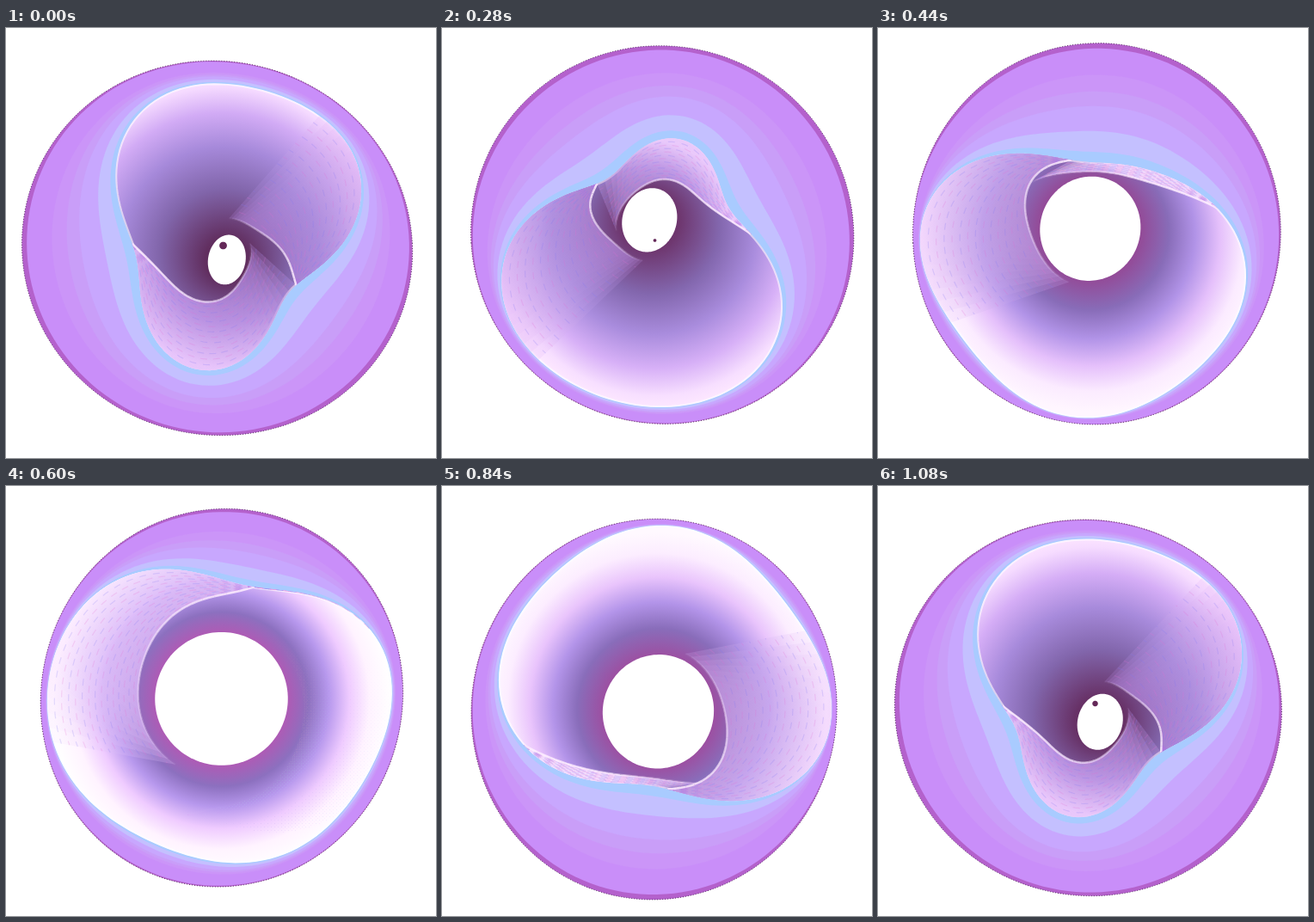
These frames come from a looping animation (500 by 500 pixels, 1120 ms). An HTML page with a canvas:

```html
<!DOCTYPE html>
<html lang="en">
<head>
<meta charset="utf-8">
<title>Twisting ring</title>
<style>
  html, body { margin: 0; width: 100%; height: 100%; overflow: hidden; background: #fff; }
  canvas { display: block; width: 500px; height: 500px; }
</style>
</head>
<body>
<canvas id="stage" width="500" height="500"></canvas>
<script>
const ctx = document.getElementById('stage').getContext('2d');
const LOOP = 1120, STEP = 40, OPEN_AT = 660, SAMPLES = 48;
const { sin, cos, PI } = Math, RAD = PI / 180;

const clamp = (v, lo, hi) => Math.max(lo, Math.min(hi, v));
const mix = (a, b, u) => a + (b - a) * u;
const mixAll = (a, b, u) => a.map((v, i) => mix(v, b[i], u));
const smooth = u => u * u * (3 - 2 * u);
const polar = (r, a) => [r * cos(a), r * sin(a)];
const rgb = hex => [1, 3, 5].map(i => parseInt(hex.slice(i, i + 2), 16));
const blend = (a, b, u) => `rgb(${mixAll(rgb(a), rgb(b), u).map(Math.round)})`;
const sweep = (from, to, at, n = SAMPLES) =>
  Array.from({ length: n + 1 }, (_, i) => at(mix(from, to, i / n) * RAD, i / n));
const loop = at => sweep(0, 360, at, 144);

// Even harmonics follow cosines of the phase and odd ones sines,
// so a negative phase is the same pose turned by 180 degrees.
function shapeAt(p) {
  const c = cos(p), c2 = cos(2 * p), s = sin(p), s2 = sin(2 * p);
  const outer = a => 219 - 4 * c
    + (1.7 * s2 - 5.7 * s) * cos(a) + 11.3 * s * sin(a)
    + (1.8 * c2 - 5.5 * c - .8) * cos(2 * a) - 2.8 * c * sin(2 * a);
  const lip = a => 160 + 21 * c + 4.5 * c2
    + (15 * s - 1.5 * s2) * cos(a) + (4 * s2 - 54 * s) * sin(a)
    + (3 + 24 * c - 10 * c2) * cos(2 * a) + (11 * c - 6 * c2) * sin(2 * a)
    + (6.5 * s - 7 * s2) * cos(3 * a) + (13 * s2 - 2 * s) * sin(3 * a)
    + (1.5 - 3 * c2) * cos(4 * a) - 6 * c2 * sin(4 * a);
  const hole = { x: 6 * s - 4 * s2, y: 23 * s - 8 * s2, w: 48 + 31 * c, h: 52 + 27 * c, tilt: .35 * s };
  return { outer, lip, hole };
}

function trace(points) {
  ctx.beginPath();
  for (const [x, y] of points) ctx.lineTo(x, y);
}

function fill(points, style) {
  trace(points);
  ctx.fillStyle = style;
  ctx.fill();
}

function gradient(x0, y0, r0, x1, y1, r1, colours) {
  const g = ctx.createRadialGradient(x0, y0, r0, x1, y1, r1);
  for (const [at, colour] of colours) g.addColorStop(at, colour);
  return g;
}

// Width from the lip as a share of the slope, with colour
const SLOPE = [[.84, '#cb95f8'], [.68, '#c99ef8'], [.54, '#c8a7fe'], [.3, '#c4c0ff'], [.1, '#a9cbff']];
// From rim to hole: fully open, fully closed
const WALL = [
  ['#ffffff', '#ffe4ff'], ['#fff4ff', '#f4d8ff'], ['#f0ccff', '#d0a8f4'],
  ['#b898ee', '#a488d8'], ['#8c70c0', '#8064a8'], ['#b05cb8', '#5a2a58']
];
const FAR = [['#d4b0f4', '#9a68b8'], ['#e4c4fc', '#aa8adc'], ['#fff4ff', '#e6bcf8']];
const NEAR = [['#ffffff', '#9c70c4'], ['#fbe4ff', '#b890e2'], ['#fff4ff', '#e8c4fc']];

// A sheet between a fold line and the rim, fading out towards its end
function drawFold(seam, edge, style, opacity) {
  for (let n = SAMPLES / 2; n <= SAMPLES; n += 2) {
    ctx.globalAlpha = .3 * opacity;
    fill([...seam.slice(0, n + 1), ...edge.slice(0, n + 1).reverse()], style);
  }
  ctx.lineWidth = 1.2;
  for (let j = 1; j < 15; j++) {
    ctx.globalAlpha = .22 * opacity;
    ctx.strokeStyle = j % 2 ? '#e070d0' : '#8078f0';
    ctx.setLineDash([8, 6 + j % 4]);
    trace(seam.map((a, i) => mixAll(a, edge[i], j / 15)));
    ctx.stroke();
  }
  ctx.setLineDash([]);
  ctx.strokeStyle = '#fff0ff';
  ctx.lineWidth = 2.5;
  for (let i = 0; i < SAMPLES; i += 2) {
    ctx.globalAlpha = .85 * opacity * (1 - i / SAMPLES);
    trace(seam.slice(i, i + 3));
    ctx.stroke();
  }
  ctx.globalAlpha = 1;
}

function drawPose(deg) {
  const { outer, lip, hole } = shapeAt(deg * RAD);
  const shut = (1 - cos(deg * RAD)) / 2, depth = Math.sqrt(shut);
  const { x, y, w, h, tilt } = hole;
  const rim = a => polar(lip(a), a);
  const holeAt = a => {
    const u = w * cos(a - tilt), v = h * sin(a - tilt);
    return [x + u * cos(tilt) - v * sin(tilt), y + u * sin(tilt) + v * cos(tilt)];
  };

  // Outer slope
  const body = loop(a => polar(outer(a), a));
  fill(body, '#b461cc');
  fill(loop(a => polar(mix(outer(a), lip(a), .045), a)), '#c98ef9');
  for (const [share, colour] of SLOPE) {
    fill(loop(a => {
      const width = outer(a) - lip(a);
      return polar(lip(a) + share * width * width / (width + 20), a);
    }), colour);
  }
  trace(body);
  ctx.strokeStyle = 'rgba(50,20,60,.75)';
  ctx.lineWidth = 1;
  ctx.setLineDash([1, 2]);
  ctx.stroke();
  ctx.setLineDash([]);

  // Inner wall
  ctx.save();
  const mouth = loop(rim);
  trace(mouth);
  ctx.clip();
  const squeeze = 1 / mix(1, .6, shut);
  fill(mouth, gradient(0, 0, 196, x, y, (w + h) / 2,
    WALL.map(([a, b], i) => [(i / 5) ** squeeze, blend(a, b, shut)])));
  ctx.globalAlpha = .6;
  ctx.strokeStyle = '#fff';
  ctx.lineWidth = 4;
  trace(mouth);
  ctx.stroke();

  // Fold lines spiral from the rim down to the hole
  const spiral = (from, to, reach) =>
    sweep(from, to, (a, u) => mixAll(rim(a), holeAt(a), reach * (1 - (1 - u) ** 4)));
  const sheet = (colours, r) => gradient(x, y, w, x, y, Math.max(r, w + 5),
    colours.map(([a, b], i) => [i / 2, blend(a, b, depth)]));
  const turn = 118 - .6 * deg, left = 150 + .2 * deg;

  const dive = .95 * smooth(clamp((deg - 20) / 80, 0, 1));
  drawFold(spiral(left, turn - 60 * dive, dive), sweep(left, turn, rim), sheet(NEAR, lip(PI / 2) - y), 1);

  const farSeam = spiral(turn, -50 - .25 * deg, .8 + .17 * sin(deg * RAD));
  const farEdge = sweep(turn, -8 - .3 * deg, rim);
  const share = clamp(.5 + deg / 40, 0, 1);
  drawFold(farSeam, farEdge, sheet(FAR, 195), share);
  ctx.rotate(PI);
  drawFold(farSeam, farEdge, sheet(FAR, 195), 1 - share);
  ctx.restore();

  fill(loop(holeAt), '#fff');
  const bud = Math.max(0, shut - .65) * 16;
  fill(loop(a => [2.5 + bud * cos(a), 3 + bud * sin(a)]), '#642858');
}

function frame(ms) {
  const t = Math.floor(ms % LOOP / STEP) * STEP;
  let phase = (t - OPEN_AT) / LOOP * 360;
  if (phase < -180) phase += 360;
  ctx.setTransform(1, 0, 0, 1, 0, 0);
  ctx.fillStyle = '#fff';
  ctx.fillRect(0, 0, 500, 500);
  ctx.translate(250, 250);
  if (phase < 0) ctx.rotate(PI);
  drawPose(Math.abs(phase));
}

const start = performance.now();
(function tick() {
  frame(performance.now() - start);
  requestAnimationFrame(tick);
})();
</script>
</body>
</html>
```
